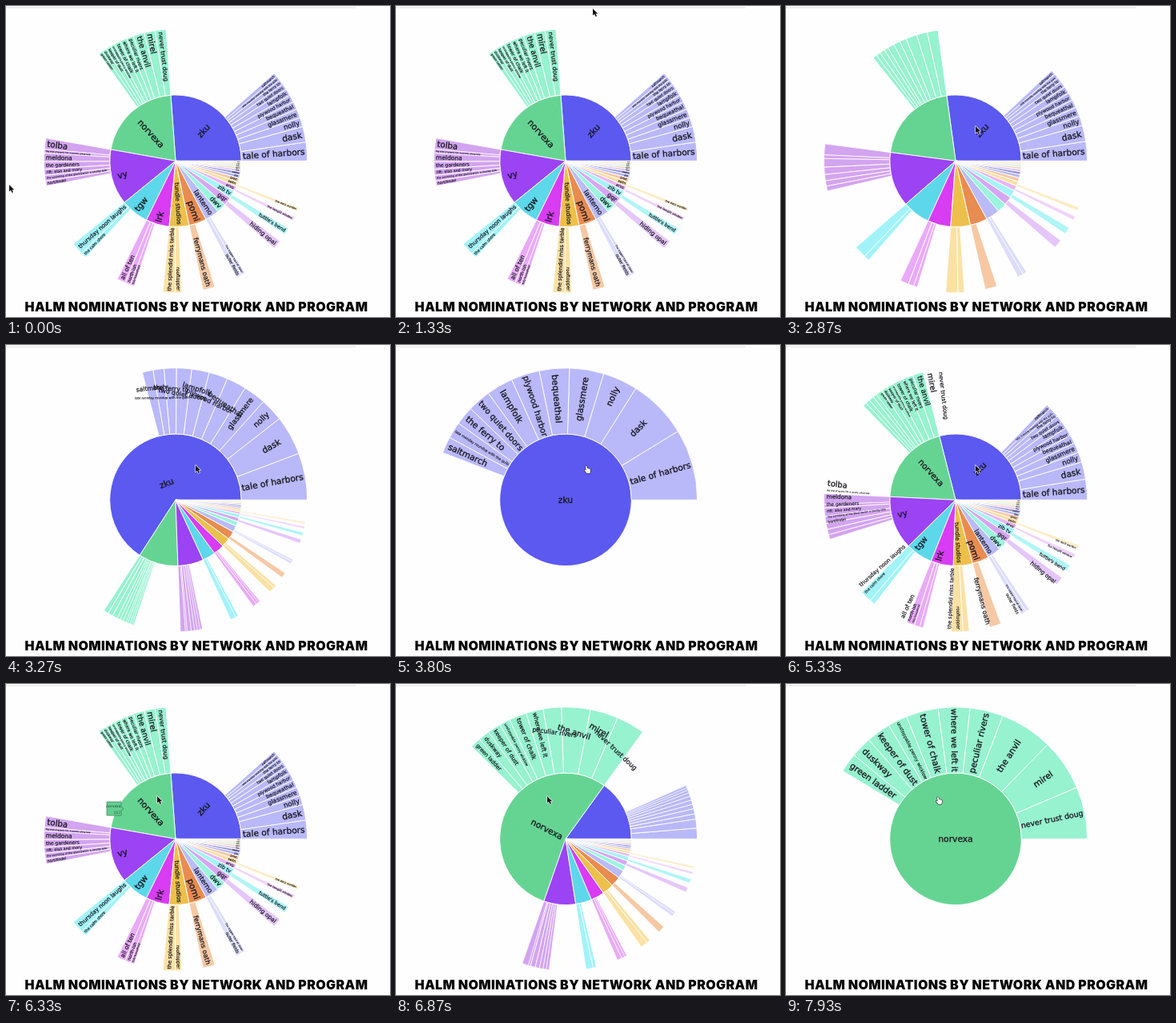
An HTML page with a canvas that plays this animation: 480 px wide and 388 px high, repeating every 8000 ms.

```html
<!DOCTYPE html>
<html lang="en">
<head>
<meta charset="utf-8">
<title>Nominations sunburst</title>
<style>
  html, body { margin: 0; width: 100%; height: 100%; overflow: hidden; background: #fefefe; }
  canvas { display: block; width: 480px; height: 388px; }
</style>
</head>
<body>
<canvas id="stage"></canvas>
<script>
const W = 480, H = 388, CX = 212, CY = 193.3, RING = 82.3, CAP = 10.7, LOOP = 8000;
const FACE = '"DejaVu Sans", Verdana, sans-serif';
const canvas = document.getElementById('stage');
const ctx = canvas.getContext('2d');
const dpr = Math.max(1, window.devicePixelRatio || 1);
canvas.width = W * dpr;
canvas.height = H * dpr;

// name, end angle, colour, leaf colour, leaves as [name, share of 360]
const NETWORKS = [
  ['zku', 94.2, '#5b59f0', '#b9b8f9', [
    ['tale of harbors', 31.4], ['dask', 26.4], ['nolly', 15.4], ['glassmere', 15.1],
    ['bequeathal', 13.3], ['plywood harbor', 12.6], ['lampfolk', 11.8], ['two quiet doors', 10.2],
    ['the ferry to', 8.3], ['late monday roundup with the gulls', 7.3], ['saltmarch', 7.2]]],
  ['norvexa', 170, '#65d492', '#97f2cf', [
    ['never trust doug', 23], ['mirel', 22.7], ['the anvil', 23.3], ['peculiar rivers', 14.7],
    ['where we left it', 14], ['tower of chalk', 14.2], ['unstoppable penny wicklow', 8.6],
    ['keeper of dust', 10.8], ['duskway', 9.2], ['green ladder', 8.5]]],
  ['vy', 219, '#9c43f3', '#d3a4f0', [
    ['tolba', 36], ['the trial of quarry hill: a county crime tale', 12], ['meldona', 28],
    ['the gardeners', 24], ['rift: elsa and mary', 20],
    ['the vanishing of the glass baron: a county tale', 18], ['hart/lindel', 16]]],
  ['tgw', 243.7, '#5cd8ea', '#a2f3f9', [['thursday noon laughs', 80], ['the calm shore', 36]]],
  ['lrk', 264.4, '#d83cf3', '#e9aaf8', [['all of ten', 66], ['north-ish', 44], ['tidy household', 28]]],
  ['tundle studios', 282, '#edc04c', '#fbe1a4', [['the splendid miss tarble', 112], ['rooftopper', 58]]],
  ['pomi', 297.5, '#e88c50', '#f6c9a4', [['ferrymans oath', 125]]],
  ['lanterno', 310, '#babbf7', '#dcdcfc', [['outer fields', 75], ['the copper road at dawn', 50]]],
  ['dwv', 318.5, '#9bf4df', '#c8f9ee', []],
  ['gqr', 326, '#d6a6f4', '#e5c6fa', [['hiding opal', 190]]],
  ['zib tv', 333, '#a3f3f9', '#b0f5f5', [['tuttle\'s bend', 165]]],
  ['arvo', 337.5, '#e9b4f5', '#f0d3fa', [['the lamplit window', 150]]],
  ['selm', 341.5, '#fadf9f', '#fdebc4', [['the dock warden', 150]]],
  ['brint', 345, '#f5c8a4', '', []],
  ['ulo', 348, '#b7b7f2', '', []],
  ['kedra', 350.5, '#8f8fd8', '', []],
  ['fim', 352.7, '#d9c2f5', '', []],
  ['wolt', 354.7, '#f3d3b8', '', []],
  ['jarn', 356.6, '#cdeee6', '', []],
  ['pell', 358.4, '#f9e6c2', '', []],
  ['osk', 360, '#f3eee0', '', []]
];

// start, duration, view before, view after; -1 is the whole chart
const ZOOMS = [[2707, 1100, -1, 0], [4330, 1270, 0, -1], [6350, 1100, -1, 1]];
const CURSOR = [[0, 4, 223], [150, 4, 223], [880, 236, 34], [1130, 246, 3], [1720, 246, 4],
  [1810, 245, 38], [2350, 237, 150], [5300, 237, 150], [6000, 189, 140], [8000, 189, 140]];

const rad = d => d * Math.PI / 180;
const lerp = (a, b, q) => a + (b - a) * q;
const clamp = (x, lo, hi) => Math.min(hi, Math.max(lo, x));
const ease = v => v < .5 ? 4 * v ** 3 : 1 - 4 * (1 - v) ** 3;

function unitWidth(text) {
  ctx.font = '100px ' + FACE;
  return ctx.measureText(text).width / 100;
}

const nodes = [], spans = [];
let from = 0;
for (const [name, end, color, leafColor, leaves] of NETWORKS) {
  const span = end - from;
  spans.push([from, end]);
  nodes.push({ name, a: from, b: end, color, ring: 1 });
  let a = from;
  for (const [leaf, share] of leaves) {
    const b = a + span * share / 360;
    nodes.push({ name: leaf, a, b, color: leafColor, ring: 2 });
    a = b;
  }
  from = end;
}

function pose(node, view) {
  const [s, e] = view < 0 ? [0, 360] : spans[view];
  const remap = x => clamp((x - s) / (e - s), 0, 1) * 360;
  const a = remap(node.a), b = remap(node.b), half = (b - a) / 2, mid = (a + b) / 2;
  if (half < .01) return { a, b, r: 0, rot: 0, size: 0 };
  if (half > 179) return { a, b, r: 0, rot: 0, size: CAP };
  const outer = node.ring * RING - 2, t = 2 * Math.tan(rad(Math.min(half, 60)));
  const size = Math.min(CAP, 79 / node.em, outer * t / (1.15 + t * node.em));
  const pull = (node.ring === 2 ? .13 : .009) * half * half;
  const r = Math.max(node.ring === 2 ? 123 : 0, outer - node.em * size / 2 - pull);
  const rot = mid <= 90 ? -mid : mid < 270 ? 180 - mid : 360 - mid;
  return { a, b, r, rot, size };
}

for (const node of nodes) {
  node.em = unitWidth(node.name);
  node.poses = { '-1': pose(node, -1), 0: pose(node, 0), 1: pose(node, 1) };
}

function sector(node, a, b) {
  if (b - a < .05) return;
  const r0 = (node.ring - 1) * RING, r1 = node.ring * RING;
  ctx.beginPath();
  ctx.arc(CX, CY, r1, -rad(a), -rad(b), true);
  if (b - a < 359.9) {
    if (r0) ctx.arc(CX, CY, r0, -rad(b), -rad(a));
    else ctx.lineTo(CX, CY);
  }
  ctx.closePath();
  ctx.fillStyle = node.color;
  ctx.fill();
  ctx.lineWidth = Math.min(.9, .25 + (b - a) * .3);
  ctx.strokeStyle = '#fff';
  ctx.stroke();
}

function label(text, mid, r, rot, size) {
  if (size < .2) return;
  ctx.save();
  ctx.translate(CX + r * Math.cos(rad(mid)), CY - r * Math.sin(rad(mid)));
  ctx.rotate(rad(rot));
  ctx.scale(size / 20, size / 20);
  ctx.font = '20px ' + FACE;
  ctx.fillStyle = ctx.strokeStyle = '#17171f';
  ctx.lineWidth = .6;
  ctx.fillText(text, 0, 7);
  ctx.strokeText(text, 0, 7);
  ctx.restore();
}

function chart(t) {
  const zoom = ZOOMS.filter(z => t >= z[0]).pop() || [0, 1, -1, -1];
  const q = ease(clamp((t - zoom[0]) / zoom[1], 0, 1));
  const ends = n => [n.poses[zoom[2]], n.poses[zoom[3]]];
  for (const n of nodes) {
    const [A, B] = ends(n);
    sector(n, lerp(A.a, B.a, q), lerp(A.b, B.b, q));
  }
  ctx.textAlign = 'center';
  for (const n of nodes) {
    const [A, B] = ends(n);
    if (!B.size) continue;
    // labels that enter grow in place; the others travel with their sector
    const S = A.size ? A : { ...B, size: 0 };
    const mid = (lerp(S.a, B.a, q) + lerp(S.b, B.b, q)) / 2;
    label(n.name, mid, lerp(S.r, B.r, q), lerp(S.rot, B.rot, q), lerp(S.size, B.size, q));
  }
}

function tooltip() {
  ctx.beginPath();
  ctx.moveTo(126, 147);
  for (const [x, y] of [[144, 147], [144, 153], [147, 155.5], [144, 158], [144, 164], [126, 164]]) ctx.lineTo(x, y);
  ctx.closePath();
  ctx.fillStyle = '#62cf8e';
  ctx.fill();
  ctx.lineWidth = .7;
  ctx.strokeStyle = '#3f7a58';
  ctx.stroke();
  ctx.font = '4.5px ' + FACE;
  ctx.textAlign = 'right';
  ctx.fillStyle = '#244a36';
  ctx.fillText('norvexa', 143.5, 154);
  ctx.fillText('157', 143, 161.5);
}

function cursor(t) {
  const i = Math.max(1, CURSOR.findIndex(p => p[0] > t));
  const [t0, x0, y0] = CURSOR[i - 1], [t1, x1, y1] = CURSOR[i];
  const v = (t - t0) / (t1 - t0), q = v * v * (3 - 2 * v);
  const hand = (t > 3500 && t < 4330) || t > 7200;
  const arrow = new Path2D('M0 0V8.5L2 6.8L3.5 10L5 9.3L3.6 6.2H6.2Z');
  const pointer = new Path2D('M0 1.6Q1 .4 1.8 1.6L2.2 4L5 4.6Q6.4 5 6 7L5.4 10H1.6L-1.2 6.8Q-1.6 5.6 -.4 5.8L.6 6.2Z');
  const shape = hand ? pointer : arrow;
  ctx.save();
  ctx.translate(lerp(x0, x1, q), lerp(y0, y1, q));
  ctx.lineJoin = 'round';
  ctx.lineWidth = 1.2;
  ctx.strokeStyle = hand ? '#222' : '#fff';
  ctx.fillStyle = hand ? '#fff' : '#111';
  ctx.stroke(shape);
  ctx.fill(shape);
  ctx.restore();
}

function title() {
  ctx.font = '900 16px Inter, "Open Sans", sans-serif';
  ctx.letterSpacing = '.4px';
  ctx.textAlign = 'center';
  ctx.fillStyle = '#000';
  ctx.fillText('HALM NOMINATIONS BY NETWORK AND PROGRAM', 238, 381);
  ctx.letterSpacing = '0px';
}

function draw(now) {
  const t = now % LOOP;
  ctx.setTransform(dpr, 0, 0, dpr, 0, 0);
  ctx.fillStyle = '#fefefe';
  ctx.fillRect(0, 0, W, H);
  ctx.fillStyle = '#eeeeee';
  ctx.fillRect(0, 1, 437, 2);
  chart(t);
  if (t > 6060 && t < 6350) tooltip();
  title();
  cursor(t);
}

const begin = performance.now();
function tick() {
  draw(performance.now() - begin);
  requestAnimationFrame(tick);
}
tick();
</script>
</body>
</html>
```
